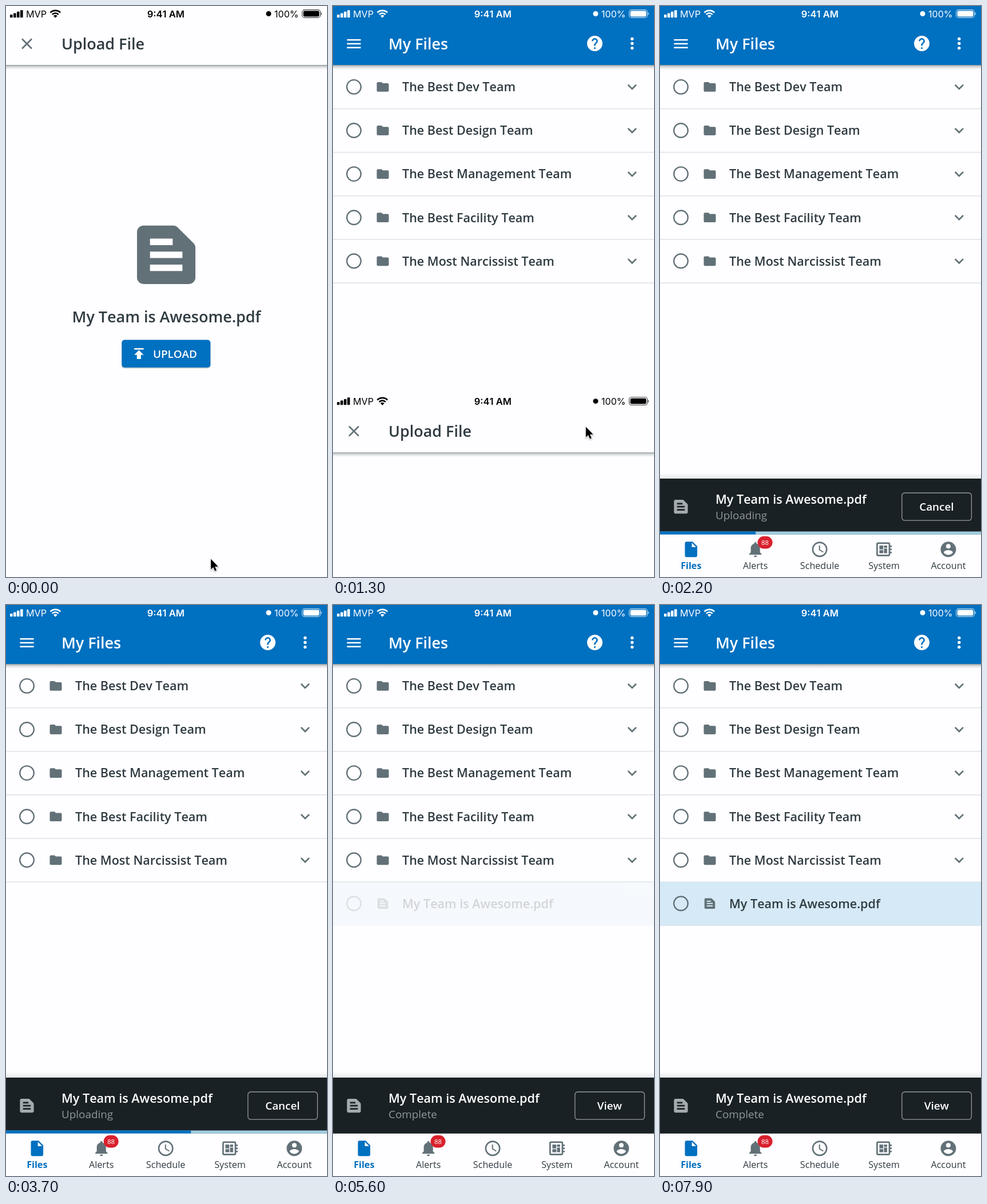
Recreate the animation shown at these times as an HTML page. Size 561 by 998 pixels, loop 8000 ms.

```html
<!DOCTYPE html>
<html lang="en">
<head>
<meta charset="utf-8">
<title>File upload</title>
<style>
html, body { margin: 0; width: 100%; height: 100%; overflow: hidden; background: #fefdff; }
svg { display: block; width: 100vw; height: 100vh; }
text { font-family: "Open Sans", sans-serif; font-kerning: none; white-space: pre; }
.status text { font-family: Inter, sans-serif; }
#cursor { paint-order: stroke; filter: drop-shadow(0 1px 1px rgba(0, 0, 0, .35)); }
</style>
</head>
<body>
<svg id="stage" viewBox="0 0 561 998" xmlns="http://www.w3.org/2000/svg"></svg>
<script>
const BLUE = '#0070c0', GREY = '#627178', INK = '#2f3b41', PAPER = '#fefdff', DARK = '#1a2124';
const LOOP = 8000, WIDTH = 561, HEIGHT = 998;
const FILE = 'My Team is Awesome.pdf';

// Icons on a 24 unit grid
const ICONS = {
  close: 'M19 6.41 17.59 5 12 10.59 6.41 5 5 6.41 10.59 12 5 17.59 6.41 19 12 13.41 17.59 19 19 17.59 13.41 12z',
  menu: 'M3 18h18v-2H3zM3 13h18v-2H3zM3 6v2h18V6z',
  help: 'M12 2a10 10 0 1 0 0 20 10 10 0 0 0 0-20zm1 17h-2v-2h2zm2.07-7.75-.9.92C13.45 12.9 13 13.5 13 15h-2v-.5c0-1.1.45-2.1 1.17-2.83l1.24-1.26c.37-.36.59-.86.59-1.41a2 2 0 0 0-4 0H8a4 4 0 0 1 8 0c0 .88-.36 1.68-.93 2.25z',
  more: 'M12 8a2 2 0 1 0 0-4 2 2 0 0 0 0 4zm0 2a2 2 0 1 0 0 4 2 2 0 0 0 0-4zm0 6a2 2 0 1 0 0 4 2 2 0 0 0 0-4z',
  radio: 'M12 2a10 10 0 1 0 0 20 10 10 0 0 0 0-20zm0 18.2a8.2 8.2 0 1 1 0-16.4 8.2 8.2 0 0 1 0 16.4z',
  folder: 'M10 4H4c-1.1 0-2 .9-2 2v12c0 1.1.9 2 2 2h16c1.1 0 2-.9 2-2V8c0-1.1-.9-2-2-2h-8z',
  expand: 'M16.59 8.59 12 13.17 7.41 8.59 6 10l6 6 6-6z',
  doc: 'M20.41 8.41l-4.83-4.83C15.21 3.21 14.7 3 14.17 3H5c-1.1 0-2 .9-2 2v14c0 1.1.9 2 2 2h14c1.1 0 2-.9 2-2V9.83c0-.53-.21-1.04-.59-1.42zM7 7h7v2H7zM17 17H7v-2h10zM17 13H7v-2h10z',
  upload: 'M5 4v2h14V4zm0 10h4v6h6v-6h4l-7-7z',
  page: 'M6 2c-1.1 0-2 .9-2 2v16c0 1.1.9 2 2 2h12c1.1 0 2-.9 2-2V8l-6-6zm7 7V3.5L18.5 9z',
  bell: 'M12 22c1.1 0 2-.9 2-2h-4c0 1.1.89 2 2 2zm6-6v-5c0-3.07-1.64-5.64-4.5-6.32V4a1.5 1.5 0 0 0-3 0v.68C7.63 5.36 6 7.92 6 11v5l-2 2v1h16v-1z',
  clock: 'M12 2a10 10 0 1 0 0 20 10 10 0 0 0 0-20zm0 18a8 8 0 1 1 0-16 8 8 0 0 1 0 16zm.5-13H11v6l5.25 3.15.75-1.23-4.5-2.67z',
  board: 'M22 9V7h-2V5c0-1.1-.9-2-2-2H4c-1.1 0-2 .9-2 2v14c0 1.1.9 2 2 2h14c1.1 0 2-.9 2-2v-2h2v-2h-2v-2h2v-2h-2V9zm-4 10H4V5h14zM6 13h5v4H6zm6-6h4v3h-4zM6 7h5v5H6zm6 4h4v6h-4z',
  account: 'M12 2a10 10 0 1 0 0 20 10 10 0 0 0 0-20zm0 3a3 3 0 1 1 0 6 3 3 0 0 1 0-6zm0 14.2a7.2 7.2 0 0 1-6-3.22c.03-1.99 4-3.08 6-3.08s5.97 1.09 6 3.08a7.2 7.2 0 0 1-6 3.22z'
};

const icon = (name, x, y, fill, scale = 1.346) =>
  `<path d="${ICONS[name]}" fill="${fill}" fill-rule="evenodd" transform="translate(${x} ${y}) scale(${scale}) translate(-12 -12)"/>`;

const text = (str, x, y, size, fill, weight = 400, extra = '') =>
  `<text x="${x}" y="${y}" font-size="${size}" fill="${fill}" font-weight="${weight}" ${extra}>${str}</text>`;

const rect = (x, y, w, h, fill, extra = '') =>
  `<rect x="${x}" y="${y}" width="${w}" height="${h}" fill="${fill}" ${extra}/>`;

const centred = 'text-anchor="middle"';

function statusBar(color) {
  const bars = [0, 1, 2, 3].map(i =>
    rect(7 + i * 6, 15 - i * 2.6, 4.6, 5.2 + i * 2.6, color, 'rx="1"')).join('');
  const arc = r => {
    const d = r * 0.72;
    return `<path d="M${86.3 - d} ${20.3 - d}A${r} ${r} 0 0 1 ${86.3 + d} ${20.3 - d}" fill="none" stroke="${color}" stroke-width="2.7"/>`;
  };
  return `<g class="status">${bars}
    ${text('MVP', 35, 19.5, 16.2, color)}
    ${arc(12.2)}${arc(7.6)}
    <path d="M86.3 20.8l-3.3-3.6a4.7 4.7 0 0 1 6.6 0z" fill="${color}"/>
    ${text('9:41 AM', 279.3, 19.5, 16.5, color, 600, centred)}
    <circle cx="459" cy="13.5" r="4.5" fill="${color}"/>
    ${text('100%', 511.5, 19.5, 16, color, 400, 'text-anchor="end"')}
    ${rect(517.6, 6.6, 31.8, 13.8, 'none', `rx="4" stroke="${color}" stroke-width="1.1" stroke-opacity=".75"`)}
    ${rect(519.6, 8.6, 27.8, 9.8, color, 'rx="2.2"')}
    <path d="M550.7 11q2.4 2.5 0 5z" fill="${color}"/></g>`;
}

const header = (fill, color, title) =>
  rect(0, 103, WIDTH, 8, 'url(#below)') + rect(0, 0, WIDTH, 103, fill) +
  statusBar(color) + text(title, 97, 76, 26.93, color === '#000' ? INK : color, 600);

const rowLine = y => rect(0, y, WIDTH, 1.3, '#dbdee3');

function folderRow(name, i) {
  const y = 141.4 + i * 76.1;
  return icon('radio', 36.5, y, GREY) + icon('folder', 87, y, GREY, 1.05) +
    text(name, 121, y + 7.8, 21.54, INK, 600) + icon('expand', 522.8, y, GREY) + rowLine(y + 37.6);
}

function tab([name, label], i) {
  const x = 54.3 + i * 112.4, on = i === 0;
  return icon(name, x, 949.7, on ? BLUE : GREY) +
    text(label, x, 983.7, 16.16, on ? BLUE : INK, on ? 700 : 400, centred);
}

const folders = ['Dev', 'Design', 'Management', 'Facility'].map(s => `The Best ${s} Team`)
  .concat('The Most Narcissist Team');
const tabs = [['page', 'Files'], ['bell', 'Alerts'], ['clock', 'Schedule'], ['board', 'System'], ['account', 'Account']];

const gradient = (id, from, to) => `<linearGradient id="${id}" x2="0" y2="1">
  <stop offset="0" stop-color="#33484c" stop-opacity="${from}"/>
  <stop offset=".4" stop-color="#33484c" stop-opacity="${(from + to) * 0.35}"/>
  <stop offset="1" stop-color="#33484c" stop-opacity="${to}"/></linearGradient>`;

const stage = document.getElementById('stage');
stage.innerHTML = `
<defs>${gradient('below', 0.55, 0)}${gradient('above', 0, 0.12)}</defs>
${rect(0, 0, WIDTH, HEIGHT, PAPER)}
${header(BLUE, '#fff', 'My Files')}
${icon('menu', 36.5, 66, '#fff')}${icon('help', 457.5, 65.5, '#fff')}${icon('more', 522.8, 65.5, '#fff')}
${folders.map(folderRow).join('')}
<g id="newRow">
  ${rect(0, 484, WIDTH, 75.5, '#d5e9f6')}${rect(0, 559.3, WIDTH, 1.2, '#c9dbe6')}
  ${icon('radio', 36.5, 521.8, GREY)}${icon('doc', 87, 521.8, GREY, 1.03)}
  ${text(FILE, 121, 529.6, 21.54, INK, 600)}
</g>
<g id="snack">
  ${rect(0, 816, WIDTH, 10, 'url(#above)')}${rect(0, 826, WIDTH, 98, DARK)}
  ${icon('doc', 36.5, 875.2, '#a4abae')}
  ${text(FILE, 97, 870, 21.54, '#fff', 600)}
  ${text('', 97, 897.3, 18.85, '#90989b', 400, 'id="state"')}
  ${rect(422.8, 851, 121.6, 48.2, 'none', 'rx="5" stroke="#949a9d" stroke-width="1.3"')}
  ${text('', 483.4, 882.2, 18.85, '#fff', 600, centred + ' id="action"')}
  <g id="progress">${rect(0, 918.4, WIDTH, 5.4, '#a0cce0')}${rect(0, 918.4, 0, 5.4, BLUE, 'id="bar"')}</g>
</g>
${rect(0, 923.8, WIDTH, 75, PAPER)}
${tabs.map(tab).join('')}
${rect(170.6, 926.7, 26, 21.8, '#d9202d', 'rx="10.9"')}
${text('88', 183.6, 942, 11.6, '#fff', 400, centred)}
<g id="sheet">
  ${rect(0, 0, WIDTH, HEIGHT, PAPER)}
  ${header(PAPER, '#000', 'Upload File')}
  ${icon('close', 36.5, 66, GREY)}
  ${icon('doc', 280, 434.9, GREY, 5.67)}
  ${text(FILE, 280.5, 552.5, 26.93, INK, 600, centred)}
  ${rect(202, 585, 155.5, 48.5, '#33484c', 'rx="5" opacity=".3"')}
  ${rect(202.3, 583.5, 155, 48.3, BLUE, 'rx="5" id="button"')}
  ${icon('upload', 232.3, 607.5, '#fff', 1.18)}
  ${text('UPLOAD', 257, 614.8, 18.85, '#fff', 600)}
</g>
<path id="cursor" d="M0 0V18.2L4.2 14.4 7 21 10 19.7 7.2 13.2H12.8Z" fill="#000" stroke="#fff" stroke-width="2"/>`;

const el = Object.fromEntries([...stage.querySelectorAll('[id]')].map(n => [n.id, n]));
const clamp = v => Math.min(1, Math.max(0, v));
const span = (t, start, end) => clamp((t - start) / (end - start));
const inOut = x => x < 0.5 ? 4 * x ** 3 : 1 - 4 * (1 - x) ** 3;

// cubic-bezier(.4, 0, .2, 1)
function smooth(x) {
  let lo = 0, hi = 1, s = x;
  for (let i = 0; i < 24; i++) {
    s = (lo + hi) / 2;
    const r = 1 - s;
    if (1.2 * r * r * s + 0.6 * r * s * s + s ** 3 < x) lo = s; else hi = s;
  }
  return 3 * (1 - s) * s * s + s ** 3;
}

// [start, end, share of the bar gained]
const steps = [[1850, 2200, 0.298], [2350, 2900, 0.202], [3460, 4510, 0.4], [4650, 5000, 0.1]];

const shift = (node, x, y) => node.setAttribute('transform', `translate(${x.toFixed(2)} ${y.toFixed(2)})`);

function cursorAt(t) {
  if (t < 1102) {
    const k = smooth(span(t, 50, 850));
    return [358 - 61 * k, 966.5 - 352 * k];
  }
  const k = ((t - 1102) / 200) ** 1.5;
  return [297 + 146 * k, 614.5 + 122 * k];
}

function draw(t) {
  const done = t >= 5300;
  shift(el.sheet, 0, HEIGHT * inOut(span(t, 1002, 1528)));
  el.sheet.style.display = t < 1528 ? '' : 'none';
  el.button.setAttribute('fill', t >= 800 && t < 1000 ? '#0066af' : BLUE);

  shift(el.cursor, ...cursorAt(Math.min(t, 1700)));
  el.cursor.style.display = t < 1700 ? '' : 'none';

  shift(el.snack, 0, 110 * (1 - smooth(span(t, 1480, 1800))));
  el.snack.style.display = t > 1480 ? '' : 'none';
  const share = steps.reduce((sum, [a, b, gain]) => sum + gain * smooth(span(t, a, b)), 0);
  el.bar.setAttribute('width', (WIDTH * share).toFixed(2));
  el.progress.style.display = done ? 'none' : '';
  el.state.textContent = done ? 'Complete' : 'Uploading';
  el.action.textContent = done ? 'View' : 'Cancel';

  el.newRow.style.opacity = span(t, 5500, 6000);
}

const began = performance.now();
function tick() {
  draw((performance.now() - began) % LOOP);
  requestAnimationFrame(tick);
}
tick();
</script>
</body>
</html>
```
